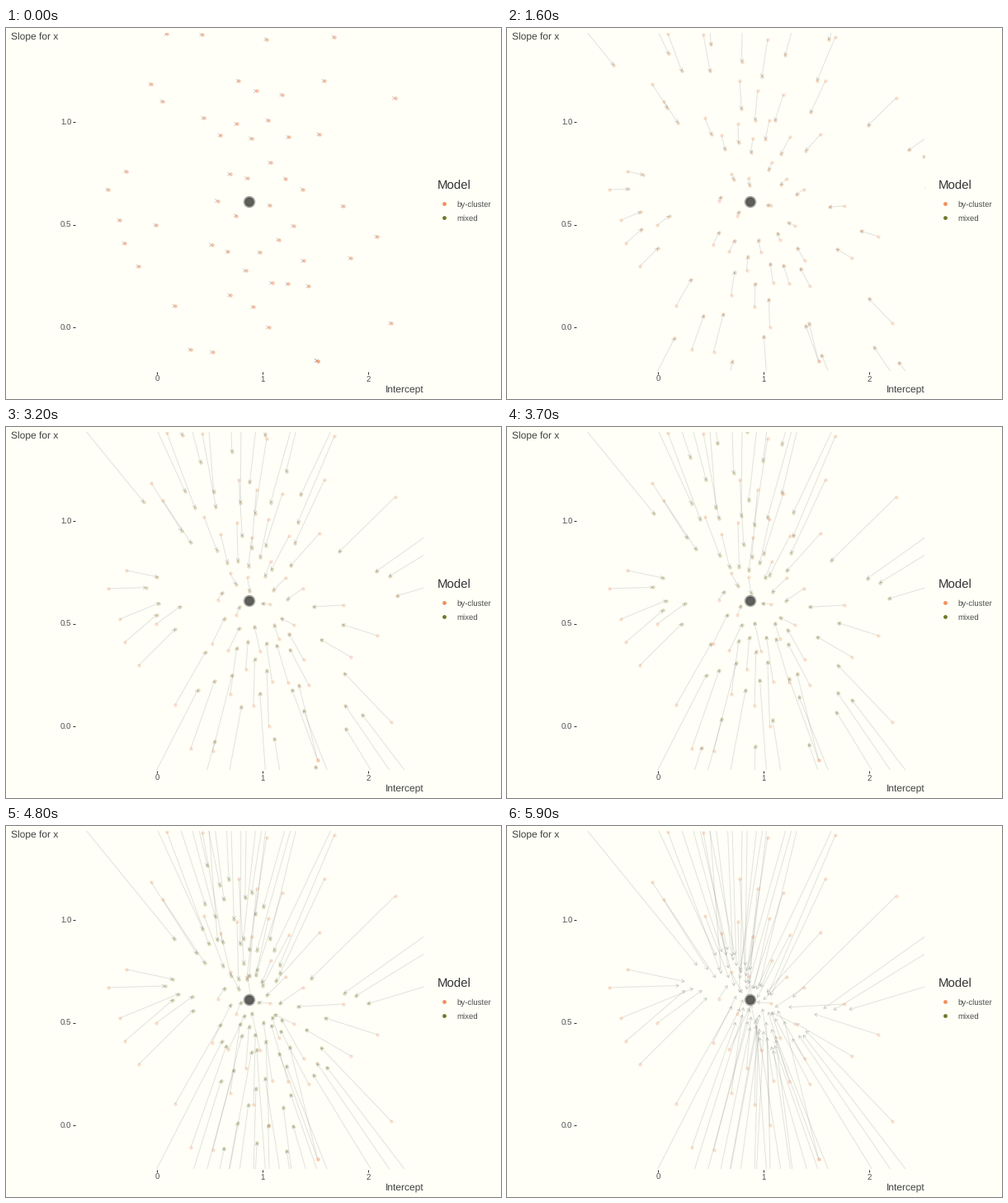
These frames come from a looping animation (600x450 px, 8000 ms). A matplotlib script:

```python
import numpy as np
import matplotlib.pyplot as plt
from matplotlib.animation import FuncAnimation
from matplotlib.collections import LineCollection
from matplotlib.colors import to_rgb
from matplotlib.patches import Circle, Rectangle

plt.rcParams["text.hinting"] = "none"

W, H, DPI = 600, 450, 100
PX = 72 / DPI                      # points per pixel
FRAMES, STEP_MS, MOVE = 80, 100, 59
PAPER, ORANGE, OLIVE = "#fffff8", "#f28f5e", "#6b7a2a"
LEFT, TOP, RIGHT, BOTTOM = 84, 5.5, 506, 416
CENTER = np.array([295, 211])
HEAD, SPREAD = 4, np.radians(30)
GOLDEN = (np.sqrt(5) - 1) / 2
rng = np.random.default_rng(7)

# Outlying clusters; the rest are spread by rule.
OUTLIERS = [
    (195, 7), (238, 8), (316, 13.5), (398, 11), (176, 68), (190, 89),
    (240, 109), (386, 64), (471.5, 85), (380, 129), (146, 174), (124, 196),
    (138, 233), (144, 261), (161, 289), (182, 239), (409, 216), (450, 253),
    (418, 279), (367, 313), (467, 358), (377.5, 403.5), (377.5, 403.5),
    (205, 337), (224, 390), (250.5, 393), (91.5, -1.5), (525, 121),
    (546, 131), (543, 184), (479, 437), (518, 462),
]


def core(n):
    """Even spread over a tall ellipse around the overall mean."""
    k = np.arange(n)
    r = np.sqrt((k + 1.5) / (n + 1))
    a = 2 * np.pi * GOLDEN * k
    return np.column_stack([306 + 62 * r * np.cos(a), 215 + 165 * r * np.sin(a)])


def fan(n, x0, x1, y0, y1):
    """Clusters beyond one edge, ever farther out."""
    k = np.arange(n)
    x = x0 + (x1 - x0) * (0.5 + k * GOLDEN) % (x1 - x0) if False else \
        x0 + (x1 - x0) * ((0.5 + k * GOLDEN) % 1)
    return np.column_stack([x, y0 + (y1 - y0) * (k / n) ** 1.5])


def shrink(points):
    """Pull estimates towards the mean, the more so the farther they are."""
    dx, dy = (points - CENTER).T
    x = 0.46 * dx / (1 + (dy / 260) ** 2) + 15 * np.tanh(dy / 300)
    y = 22 * np.tanh(dx / 170) + 45 * np.tanh(dy / 300)
    return CENTER + np.column_stack([x, y]) + rng.normal(0, 6, points.shape)


start = np.vstack([OUTLIERS, core(28), fan(18, 140, 430, -10, -430),
                   fan(18, 130, 500, 425, 1080)])
shift = shrink(start) - start
angle = np.arctan2(shift[:, 1], shift[:, 0])

fig = plt.figure(figsize=(W / DPI, H / DPI), dpi=DPI, facecolor=PAPER)
ax = fig.add_axes([0, 0, 1, 1])
ax.set(xlim=(0, W), ylim=(H, 0))
ax.axis("off")


def label(x, y, text, size, color="#4d4d4d", ha="left"):
    ax.text(x, y, text, fontsize=size * PX, color=color, ha=ha,
            va="baseline", family="Liberation Sans")


def tick(xs, ys):
    ax.plot(xs, ys, color="#333333", lw=1.07 * PX, solid_capstyle="butt")


def dots(points, color, alpha, z, width=4.4):
    return ax.scatter(points[:, 0], points[:, 1], s=(width * PX) ** 2,
                      c=[color], alpha=alpha, linewidths=0, zorder=z)


def strokes(alpha, z):
    lines = LineCollection([], colors="#5a5a5a", alpha=alpha, linewidths=PX,
                           capstyle="butt", joinstyle="round", zorder=z)
    return ax.add_collection(lines, autolim=False)


def disc(radius, color, z):
    ax.add_patch(Circle(CENTER, radius, fc=color, lw=0, zorder=z))


label(5.5, 15, "Slope for x", 12, "#404040")
label(506.5, 442, "Intercept", 12, "#404040", "right")
label(522.5, 196, "Model", 15, "#333333")
for value, y in (("1.0", 114), ("0.5", 238.5), ("0.0", 363)):
    label(79.3, y + 3.7, value, 9.6, ha="right")
    tick([LEFT - 3, LEFT], [y, y])
for value, x in (("0", 183), ("1", 311), ("2", 439)):
    label(x, 429.3, value, 9.6, ha="center")
    tick([x, x], [BOTTOM + 0.5, BOTTOM + 3.5])
for name, y, color in (("by-cluster", 213, ORANGE), ("mixed", 230, OLIVE)):
    dots(np.array([[531.3, y]]), color, 1, 3, 4.8)
    label(546.8, y + 3.8, name, 9.7)

own = dots(start, ORANGE, 0.28, 2)
mixed = dots(start, ORANGE, 0.3, 5)
trails = strokes(0.17, 3)
heads = strokes(0.28, 4)
panel = Rectangle((LEFT, TOP), RIGHT - LEFT, BOTTOM - TOP,
                  transform=ax.transData)
for artist in (own, mixed, trails, heads):
    artist.set_clip_path(panel)

disc(7.2, "#a2a29e", 6)
disc(5.4, "#4a4a47", 7)
disc(4.4, "#5e5e5a", 8)


def wing(tip, turn):
    return tip - HEAD * np.column_stack([np.cos(turn), np.sin(turn)])


def draw(i):
    p = min(i / MOVE, 1)
    tip = start + p * shift
    aim = angle if i else np.zeros(len(tip))
    trails.set_segments(np.stack([start, tip], axis=1))
    heads.set_segments(np.stack([wing(tip, aim + SPREAD), tip,
                                 wing(tip, aim - SPREAD)], axis=1))
    mixed.set_offsets(tip)
    mixed.set_facecolor((1 - p) * np.array(to_rgb(ORANGE))
                        + p * np.array(to_rgb(OLIVE)))
    mixed.set_visible(i < MOVE)
    return own, trails, heads, mixed


anim = FuncAnimation(fig, draw, frames=FRAMES, interval=STEP_MS,
                     init_func=lambda: draw(0), repeat=True, repeat_delay=0)
plt.show()
```
